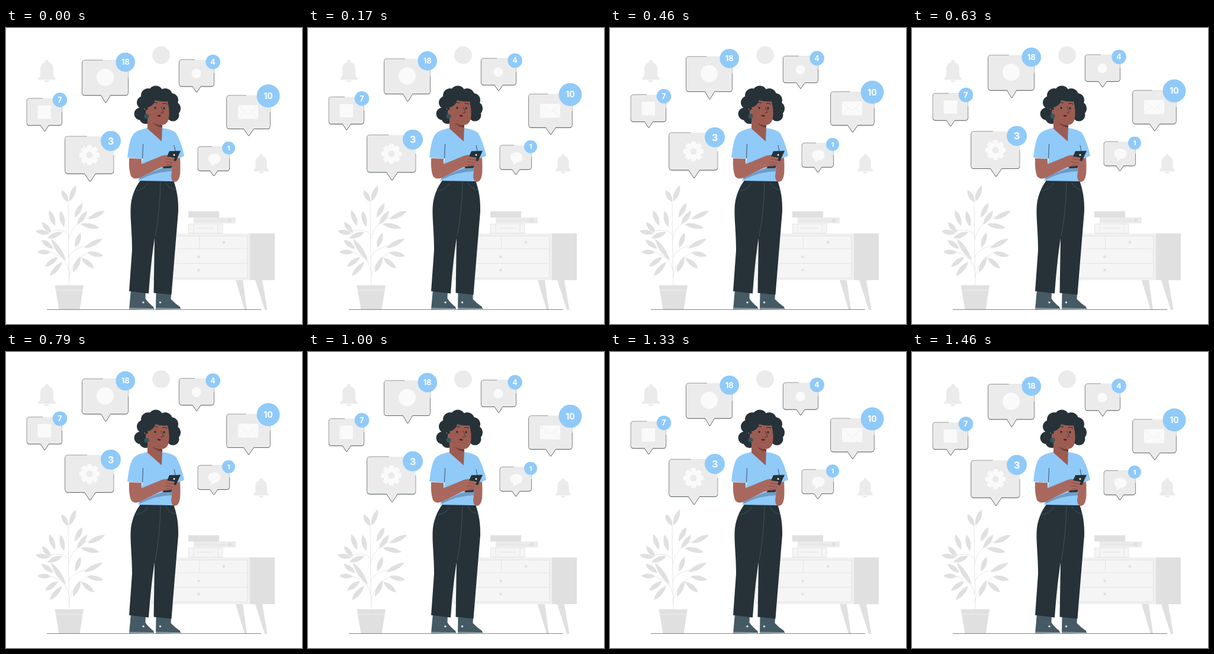
Write an HTML page that moves like this. It is 500x500 px and loops after 1500 ms.

```html
<!DOCTYPE html>
<html lang="en">
<head>
<meta charset="utf-8">
<title>Notifications</title>
<style>
  html, body { margin: 0; width: 100%; height: 100%; overflow: hidden; background: #fff; }
  svg { display: block; width: 100%; height: 100%; }
  text { font-family: Inter, "Open Sans", sans-serif; font-weight: 700; fill: #fff; text-anchor: middle; }
</style>
</head>
<body>
<svg id="stage" viewBox="0 0 500 500">
  <defs>
    <path id="bell" d="M69 54a3 3 0 0 1 3 4c6 1.500 8 6 8 12v8c0 3 1 4.500 3.500 6.500q1.500 2.500-1 3H55.500q-2.500-.5-1-3c2.500-2 3.500-3.500 3.500-6.500v-8c0-6 2-10.500 8-12a3 3 0 0 1 3-4zM64.500 88.500h9a4.500 3 0 0 1-9 0z"/>
  </defs>

  <g fill="#ebebeb">
    <use href="#bell"/>
    <use href="#bell" transform="translate(371 166) scale(.87)"/>
    <circle cx="262" cy="46" r="15"/>
  </g>

  <g id="plant" fill="#e0e0e0" stroke="#e0e0e0" stroke-width=".8">
    <path fill="none" d="M107 434Q105 360 105 290M106 357Q112 328 143 318M106 350Q99 338 73 343M106 388Q111 371 145 366M106 410Q102 385 72 378M106 422Q114 388 143 378"/>
    <path stroke="none" d="M82.500 434.500H131L124.500 475.500H89.500Z"/>
    <path stroke="#f5f5f5" d="M84 443H130"/>
  </g>

  <g stroke="#e0e0e0" stroke-width=".8">
    <path fill="#f0f0f0" stroke="none" d="M245 347H412V426H245Z"/>
    <path fill="#f5f5f5" d="M245 351.500H407.500V422H245Z"/>
    <path fill="none" d="M245 373H407.500M245 397.500H407.500M326.500 351.500V373"/>
    <g fill="#e0e0e0" stroke="none">
      <path d="M412 347H454V426H412ZM388 426H400L407 476H403ZM421 426H433L441.500 476H437Z"/>
      <circle cx="368" cy="362" r="2.300"/><circle cx="325.500" cy="386.500" r="2.300"/><circle cx="325.500" cy="409" r="2.300"/>
      <path d="M308 309.500H360V320H308Z"/>
    </g>
    <path fill="#ebebeb" stroke="none" d="M317 320H388V330H317Z"/>
    <path fill="none" d="M320 325H374"/><circle cx="378" cy="325" r="3" fill="#e0e0e0"/>
    <path fill="#f5f5f5" d="M308.500 331H366V346.500H308.500ZM317 331V346M358 331V346M322 338H352"/>
  </g>

  <path stroke="#263238" stroke-width=".6" d="M69 475.600H431"/>

  <g id="woman">
    <g fill="#455a64">
      <path d="M211 442H236L235.500 457Q240 464 249 471L250 475H208Z"/>
      <path d="M253.500 447H279L278.500 458Q286 466 294 471L295 475H253Z"/>
    </g>
    <path stroke="#cfd8dc" fill="none" d="M208 473.500L249 474.500M253 473.500L294 474.500"/>
    <g fill="#cfd8dc"><circle cx="232" cy="463.500" r="1.800"/><circle cx="260.500" cy="463.500" r="1.800"/></g>

    <path fill="#263238" d="M227 257.500H283C289 275 291.500 290 291 310Q288 345 279.500 450.500L249.500 447.500 251 355Q245 392 241 448.500L208 444.500 213 375C213 345 210 325 210.500 305C211 285 219 268 227 257.500Z"/>
    <path fill="none" stroke="#455a64" stroke-width=".8" d="M261 260Q260 310 252 352M239 262Q234 272 219 275M270 261Q274 270 287 274"/>

    <g fill="#263238">
      <circle cx="253" cy="110" r="12.500"/><circle cx="240" cy="114" r="12"/><circle cx="232" cy="126" r="11"/>
      <circle cx="227" cy="145" r="10.500"/><circle cx="236" cy="151" r="11"/><circle cx="269" cy="114" r="12"/>
      <circle cx="279" cy="122" r="12"/><circle cx="283" cy="136" r="12"/><circle cx="282" cy="147" r="10.500"/>
      <path d="M235 115H282V150H235Z"/>
    </g>

    <path fill="#90caf9" d="M238 169C226 172 219 174 214 181Q208 190 205 219L231 221 227 238 223.500 258 283 259 282 230 287 222 301 216Q296 192 287 177Q280 171 264 169Z"/>
    <path fill="#6f9cc4" d="M226 253Q250 240 281 232V242Q255 242 226 256Z"/>
    <path fill="none" stroke="#263238" stroke-width=".8" d="M231.500 196L230.500 220M284 198L288 219"/>

    <path fill="#9c5c52" d="M239 150V170L263 191.500 264 165 239 148Z"/>
    <path fill="#9c5c52" d="M239 134Q249 132 252 122Q262 125 273 124Q277 140 275 152Q273 164 262 164Q247 164 240 151Q235 147 236 141Q237 136 240 138Z"/>
    <path fill="#6f3a35" d="M248 160Q256 165 264 164V168Q254 167 248 160Z"/>
    <g fill="#263238">
      <ellipse cx="252" cy="135" rx="1.600" ry="2"/><ellipse cx="267" cy="135.500" rx="1.600" ry="2"/>
      <circle cx="237.500" cy="149" r="4" fill="#37555f"/>
    </g>
    <path fill="none" stroke="#263238" stroke-width="1.100" d="M247 128Q251 124 256 127M264 128Q269 126 272 129"/>
    <path fill="none" stroke="#5f2d2a" stroke-width=".9" d="M262 133Q265 140 266 143L261 143.500"/>
    <path fill="#5b2425" d="M255 148Q258 145 262 148Q260 152 255 148Z"/>

    <g fill="#a9685e">
      <path d="M287 221L294 219Q295 235 294 247Q292 260 285 260Q279 259 279 250L282 228Z"/>
      <path d="M208 220L229 221V230L263 216Q270 213 278 216L289 219Q292 226 285 232Q278 236 262 235L226 253Q216 257 211 250Q207 238 208 220Z"/>
    </g>
    <path fill="#263238" d="M276 208L295 207.500 287 225 283 224 285 219 272 217ZM266 234L281 233 279 236.500 265 237Z"/>
    <circle cx="284" cy="214.500" r="1.400" fill="#fff"/>
    <path fill="none" stroke="#7f453f" stroke-width=".8" d="M270 221L283 223M269 226L282 228M270 231L280 232"/>
  </g>
</svg>

<script>
const stage = document.getElementById('stage');

function add(parent, tag, attrs, text) {
  const el = document.createElementNS('http://www.w3.org/2000/svg', tag);
  for (const key in attrs) el.setAttribute(key, attrs[key]);
  if (text) el.textContent = text;
  return parent.appendChild(el);
}

// Leaves: base x, base y, tip x, tip y
const leaves = [
  [105, 294, 94, 274], [107, 293, 118, 266], [116, 320, 129, 296],
  [120, 332, 137, 309], [138, 323, 167, 309], [126, 331, 158, 338],
  [98, 336, 92, 309], [83, 334, 73, 308], [76, 346, 61, 328], [74, 347, 50, 343],
  [95, 345, 70, 355], [117, 371, 126, 346], [132, 372, 163, 356],
  [101, 393, 76, 356], [80, 373, 60, 358], [76, 379, 53, 378],
  [88, 387, 66, 403], [95, 395, 74, 419],
  [113, 413, 126, 386], [137, 379, 164, 385], [127, 388, 149, 406]
];
const plant = document.getElementById('plant');
for (const [x, y, tx, ty] of leaves) {
  const dx = tx - x, dy = ty - y, k = 6 / Math.hypot(dx, dy);
  const at = (p, s) => `${x + dx * p - s * dy * k},${y + dy * p + s * dx * k}`;
  add(plant, 'path', {
    stroke: 'none',
    d: `M${x} ${y}C${at(.35, 1)} ${at(.75, .8)} ${tx},${ty}C${at(.75, -.8)} ${at(.35, -1)} ${x},${y}Z`
  });
}

function gear(g) {
  const icon = add(g, 'g', { transform: 'translate(141 215)', fill: '#fafafa' });
  for (let i = 0; i < 8; i++)
    add(icon, 'path', { d: 'M-5-11L-3.500-17H3.500L5-11Z', transform: `rotate(${i * 45})` });
  add(icon, 'circle', { r: 9.2, fill: 'none', stroke: '#fafafa', 'stroke-width': 7.4 });
}

function envelope(g) {
  add(g, 'path', { d: 'M392 130.500H426V154H392Z', fill: '#fafafa' });
  add(g, 'path', { d: 'M392 131.500L407 144.500Q409 146 411 144.500L426 131.500M392 153L403 142M426 153L415 142', fill: 'none', stroke: '#ebebeb', 'stroke-width': .7 });
}

const shape = (tag, attrs) => g => add(g, tag, { fill: '#fafafa', ...attrs });

// box: x, y, right, bottom; tail: x, y, half width; badge: x, y, radius
const bubbles = [
  { box: [128.5, 54.5, 206.5, 114], tail: [168.5, 126.5, 8], badge: [201.7, 58, 16.3], label: '18', size: 13,
    icon: shape('circle', { cx: 167.5, cy: 83.5, r: 14.5 }) },
  { box: [292.3, 53.7, 351.5, 99], tail: [322, 108.5, 7], badge: [349.6, 57.5, 12.3], label: '4', size: 12.5,
    icon: shape('circle', { cx: 321.5, cy: 77, r: 8 }) },
  { box: [35, 119, 94.7, 164.7], tail: [65.3, 174.5, 7], badge: [91, 121.7, 12.3], label: '7', size: 12.5,
    icon: shape('rect', { x: 53.5, y: 131, width: 22.5, height: 22.5 }) },
  { box: [372.7, 114, 446.3, 170.7], tail: [410, 182.3, 8.5], badge: [443, 115, 19.5], label: '10', size: 14,
    icon: envelope },
  { box: [99.7, 183.2, 182, 246.3], tail: [142, 259.5, 9.5], badge: [177, 191, 17], label: '3', size: 16.5,
    icon: gear },
  { box: [324, 200.5, 377.7, 241.5], tail: [351.2, 250, 6.5], badge: [376, 203, 11], label: '1', size: 11,
    icon: shape('path', { d: 'M352 212.500C358 212.500 362.500 216.500 362.500 221S358 230 352 230Q349.500 233 345 233Q347.500 231 346.500 228.500Q341.500 226 341.500 221C341.500 216.500 346 212.500 352 212.500Z' }) }
];

for (const { box: [x, y, r, b], tail: [tx, ty, half], badge: [cx, cy, rad], label, size, icon } of bubbles) {
  const g = add(stage, 'g', {});
  const c = 5, mx = x + (r - x) * .45, my = y + (b - y) * .5;
  const line = `M${mx} ${y}H${x + c}Q${x} ${y} ${x} ${y + c}V${b - c}Q${x} ${b} ${x + c} ${b}` +
    `H${tx - half}L${tx - 1} ${ty - .7}Q${tx} ${ty + .5} ${tx + 1} ${ty - .7}L${tx + half} ${b}` +
    `H${r - c}Q${r} ${b} ${r} ${b - c}V${my}`;
  const body = `${line}V${y + c}Q${r} ${y} ${r - c} ${y}Z`;
  add(g, 'path', { d: body, fill: '#263238', transform: 'translate(0 .5)' });
  add(g, 'path', { d: body, fill: '#ebebeb' });
  add(g, 'path', { d: line, fill: 'none', stroke: '#263238', 'stroke-width': .45 });
  icon(g);
  add(g, 'circle', { cx, cy, r: rad, fill: '#90caf9' });
  add(g, 'text', { x: cx, y: cy + size * .36, 'font-size': size }, label);

  g.animate(
    [0, -10, 0].map(dy => ({ transform: `translateY(${dy}px)` })),
    { duration: 1500, delay: -20, iterations: Infinity }
  );
}
</script>
</body>
</html>
```
